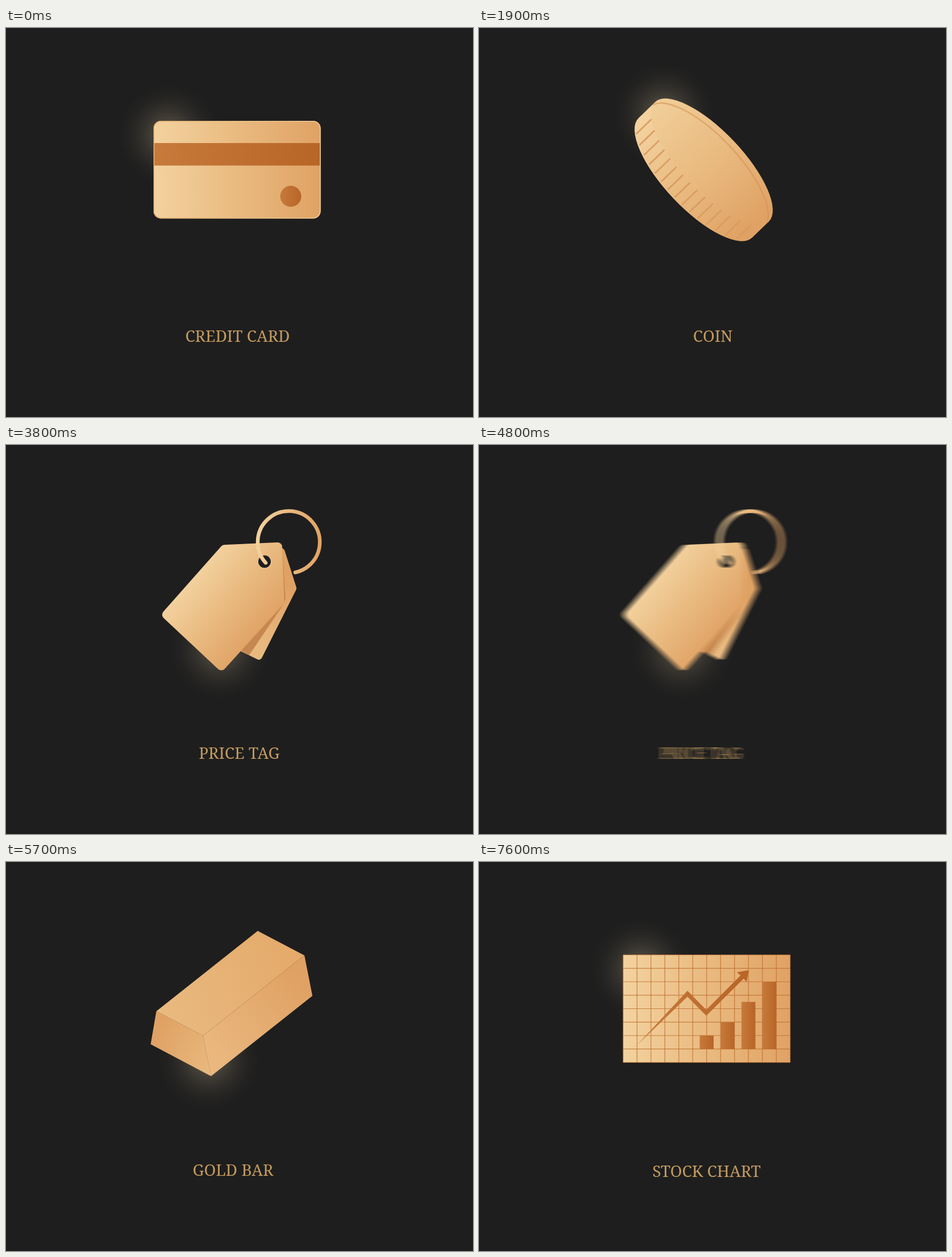
Write an HTML page with a canvas that moves like this. It is 820 px wide and 683 px high and loops after 8000 ms.

```html
<!DOCTYPE html>
<html lang="en">
<head>
<meta charset="utf-8">
<title>Gold icons</title>
<style>
  html, body { margin: 0; width: 100%; height: 100%; overflow: hidden; background: #1e1e1e; }
  canvas { display: block; width: 100vw; height: 100vh; }
</style>
</head>
<body>
<canvas id="stage" width="820" height="683"></canvas>
<script>
const W = 820, H = 683, LOOP = 8000, STEP = 100;
const HOLD = 1000, TRAVEL = 900, SHUTTER = 0.046;
const BG = '#1e1e1e', LIGHT = '#f3d29f', MID = '#e9ba80', GOLD = '#e0a264';
const RUST = '#c67a3b', DARK = '#b86527', LABEL = '#c49b5f';

// Every scene has its place in one world; a camera travels between them.
const scenes = [
  { draw: card, x: 0, y: 0 },
  { draw: coin, x: 667, y: 0 },
  { draw: tag, x: 1334, y: 0 },
  { draw: bar, x: 2017, y: 0 },
  { draw: chart, x: 2017, y: 895 },
];

const world = document.createElement('canvas');
world.width = scenes.at(-1).x + W;
world.height = scenes.at(-1).y + H;
const g = world.getContext('2d', { alpha: false, willReadFrequently: true });

function grad(x0, y0, x1, y1, ...colors) {
  const fill = g.createLinearGradient(x0, y0, x1, y1);
  colors.forEach((c, i) => fill.addColorStop(i / (colors.length - 1), c));
  return fill;
}

// Polygon with corners rounded by r.
function poly(points, fill, r = 0) {
  const first = points[0], last = points.at(-1);
  g.beginPath();
  g.moveTo((last[0] + first[0]) / 2, (last[1] + first[1]) / 2);
  points.forEach((p, i) => g.arcTo(...p, ...points[(i + 1) % points.length], r));
  g.closePath();
  g.fillStyle = fill;
  g.fill();
}

function rect(x, y, w, h, fill) {
  g.fillStyle = fill;
  g.fillRect(x, y, w, h);
}

function disc(x, y, r, fill) {
  g.beginPath();
  g.arc(x, y, r, 0, 2 * Math.PI);
  g.fillStyle = fill;
  g.fill();
}

function line(x0, y0, x1, y1) {
  g.beginPath();
  g.moveTo(x0, y0);
  g.lineTo(x1, y1);
  g.stroke();
}

function glow(x, y) {
  const r = 95, fill = g.createRadialGradient(x, y, 0, x, y, r);
  for (let k = 0; k <= 1; k += 1 / 16) {
    fill.addColorStop(k, `rgba(240,215,170,${0.35 * (1 - k) ** 1.9})`);
  }
  disc(x, y, r, fill);
}

function label(text, x, y = 551) {
  g.font = '28px "Noto Serif", serif';
  g.textAlign = 'center';
  g.fillStyle = LABEL;
  g.fillText(text, x, y);
}

function card() {
  const x = 259, y = 163, w = 293.5, h = 171.5;
  glow(285, 188);
  g.beginPath();
  g.roundRect(x, y, w, h, 13);
  g.fillStyle = grad(x, 0, x + w, 0, LIGHT, MID, GOLD);
  g.fill();
  g.beginPath();
  g.roundRect(x + .75, y + .75, w - 1.5, h - 1.5, 12.5);
  g.strokeStyle = grad(x, 0, x + w, 0, '#e3ae70', '#efcb95');
  g.lineWidth = 1.5;
  g.stroke();
  rect(x + 1.5, 202, w - 3, 39.5, grad(x, 0, x + w, 0, RUST, DARK));
  disc(500, 295.5, 18.5, grad(481, 0, 519, 0, RUST, DARK));
  label('CREDIT CARD', 406.5);
}

function coin() {
  const cx = 409, cy = 235, a = 144.8, b = 53, tilt = 46.5 * Math.PI / 180;
  const dx = -29, dy = 28, cos = Math.cos(tilt), sin = Math.sin(tilt);
  const oval = (x, y) => {
    g.beginPath();
    g.ellipse(x, y, a, b, tilt, 0, 2 * Math.PI);
  };
  glow(325, 151);

  // The edge: the back oval and the band that joins it to the face.
  const side = grad(285, 165, 475, 350, LIGHT, MID, GOLD);
  const ux = a * cos, uy = a * sin;
  oval(cx + dx, cy + dy);
  g.fillStyle = side;
  g.fill();
  poly([[cx - ux, cy - uy], [cx + ux, cy + uy],
        [cx + ux + dx, cy + uy + dy], [cx - ux + dx, cy - uy + dy]], side);

  g.strokeStyle = '#d99c61';
  g.lineWidth = 2.6;
  for (let i = -7; i <= 7; i++) {
    const u = i * 18.2, v = b * Math.sqrt(1 - (u / a) ** 2);
    const x = cx + u * cos - v * sin, y = cy + u * sin + v * cos;
    line(x, y, x + dx * .93, y + dy * .93);
  }

  g.save();
  oval(cx, cy);
  g.fillStyle = grad(320, 140, 500, 330, '#f0cc96', MID, GOLD);
  g.fill();
  g.clip();
  oval(cx - 8, cy + 8);
  g.strokeStyle = 'rgba(211,145,82,.55)';
  g.stroke();
  g.restore();
  label('COIN', 410.5);
}

function tag() {
  const fold = [488.5, 278], top = [484.5, 170.5];
  glow(376, 358);
  poly([top, [510.5, 252], [446.5, 379], [400, 356]], grad(420, 330, 500, 250, MID, GOLD), 6);
  poly([fold, [411, 360], [427, 369]], '#c68850');
  poly([top, [491, 270], fold], '#cb8c51');
  poly([[271, 298.5], [380, 175.5], top, fold, [378.5, 399]],
    grad(325, 230, 447, 333, LIGHT, MID, GOLD), 8);
  disc(454.5, 205.5, 11.8, '#f0c890');
  disc(454, 204.8, 11, BG);
  g.beginPath();
  g.arc(496.5, 170.5, 54.5, Math.PI * .767, Math.PI * .433);
  g.strokeStyle = grad(439, 0, 554, 0, LIGHT, MID, GOLD);
  g.lineWidth = 6.5;
  g.lineCap = 'round';
  g.stroke();
  g.lineCap = 'butt';
  label('PRICE TAG', 409.5);
}

function bar() {
  // The front end, drawn out along one direction.
  const a = [264, 262], b = [346, 305], c = [360, 376], d = [254, 320];
  const far = ([x, y]) => [x + 178, y - 141];
  glow(356, 347);
  poly([b, far(b), far(c), c], grad(...c, ...far(c), '#ebba81', GOLD));
  poly([a, b, c, d], grad(...d, ...c, GOLD, MID));
  poly([a, far(a), far(b), b], grad(...a, ...far(b), MID, '#e4a969'));
  label('GOLD BAR', 398.5);
}

function chart() {
  const x = 253, y = 163, w = 293.5, h = 189, cols = 12, rows = 8;
  const cw = w / cols, rh = h / rows, floor = y + 7 * rh;
  glow(285, 188);
  rect(x, y, w, h, grad(x, 0, x + w, 0, LIGHT, MID, GOLD));
  g.strokeStyle = 'rgba(186,104,42,.75)';
  g.lineWidth = 1.2;
  for (let i = 0; i <= cols; i++) line(x + i * cw, y, x + i * cw, y + h);
  for (let i = 0; i <= rows; i++) line(x, y + i * rh, x + w, y + i * rh);

  // Bars stand one and a half columns apart.
  [1, 2, 3.5, 5].forEach((n, i) => {
    const left = x + (5.5 + 1.5 * i) * cw;
    rect(left, floor - n * rh, cw, n * rh, grad(left, 0, left + cw, 0, RUST, DARK));
  });

  const peak = [366, 231.3], dip = [399, 264.8], neck = [462, 202], tip = [473.5, 190];
  const move = ([px, py], dx, dy) => [px + dx, py + dy];
  poly([[277, 322], move(peak, 0, -5.2), move(dip, 0, -5.2), move(neck, -2.7, -2.7),
        move(tip, -20.5, 3.5), tip, move(tip, -3.5, 20.5),
        move(neck, 2.7, 2.7), move(dip, 0, 5.2), move(peak, 0, 5.2)],
    grad(277, 0, 473, 0, RUST, DARK));
  label('STOCK CHART', 399.5, 553);
}

rect(0, 0, world.width, world.height, BG);
for (const s of scenes) {
  g.save();
  g.translate(s.x, s.y);
  s.draw();
  g.restore();
}

const view = document.getElementById('stage').getContext('2d', { alpha: false });
const ease = p => p * p * (3 - 2 * p);

// Shows the world at x, y, smeared dx pixels across or dy pixels down.
function shoot(x, y, dx, dy) {
  const src = g.getImageData(x, y, W + dx, H + dy).data;
  const shot = view.createImageData(W, H), out = shot.data;
  const n = dx + dy + 1, inRow = (W + dx) * 4, outRow = W * 4;
  const [lines, count, inLine, outLine, inStep, outStep] = dy
    ? [W, H, 4, 4, inRow, outRow]
    : [H, W, inRow, outRow, 4, 4];
  for (let l = 0; l < lines; l++) {
    for (let c = 0; c < 4; c++) {
      const from = l * inLine + c, to = l * outLine + c;
      let sum = 0;
      for (let i = 0; i < count + n - 1; i++) {
        const first = i - n + 1;
        sum += src[from + i * inStep];
        if (first < 0) continue;
        out[to + first * outStep] = sum / n;
        sum -= src[from + first * inStep];
      }
    }
  }
  view.putImageData(shot, 0, 0);
}

function render(step) {
  const t = step * STEP, cycle = HOLD + TRAVEL;
  const index = Math.floor(t / cycle), p = (t % cycle - HOLD + STEP) / (TRAVEL + STEP);
  const here = scenes[index], next = scenes[index + 1];
  if (p <= 0.05) return shoot(here.x, here.y, 0, 0);
  const at = (axis, q) => Math.round(here[axis] + (next[axis] - here[axis]) * ease(q));
  const x = at('x', p - SHUTTER / 2), y = at('y', p - SHUTTER / 2);
  shoot(x, y, at('x', p + SHUTTER / 2) - x, at('y', p + SHUTTER / 2) - y);
}

let shown = -1;
const begin = performance.now();
function tick() {
  const step = Math.floor((performance.now() - begin) % LOOP / STEP);
  if (step !== shown) render(shown = step);
  requestAnimationFrame(tick);
}
tick();
</script>
</body>
</html>
```
